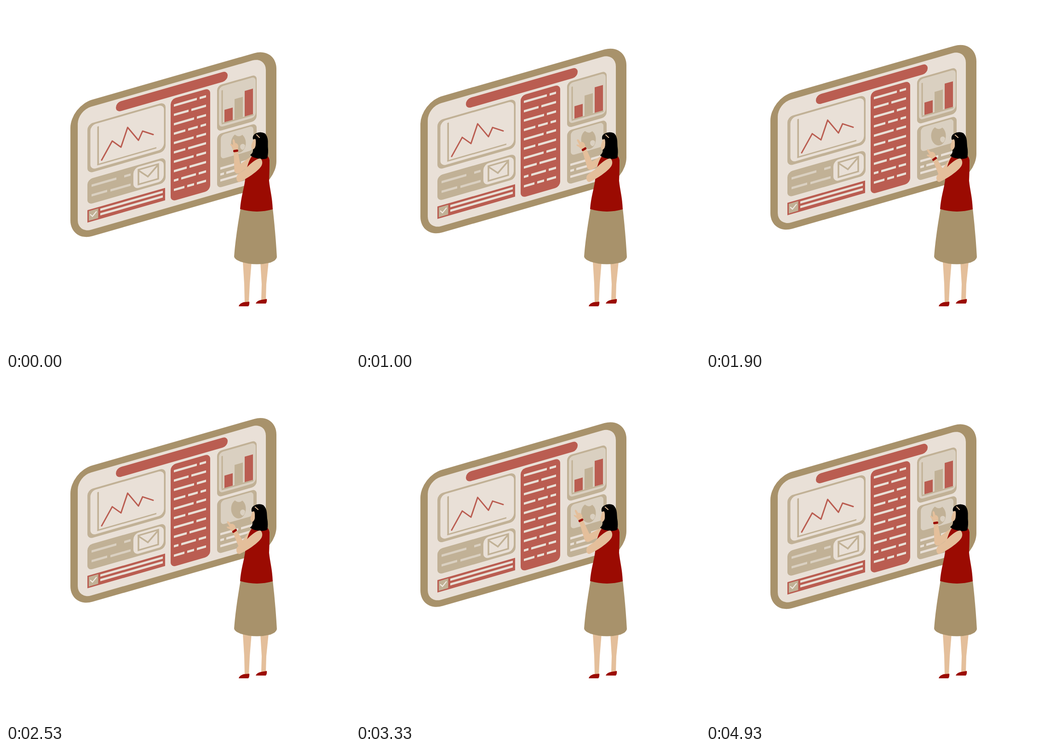
Recreate the animation shown at these times as an HTML page. Size 748 by 748 pixels, loop 5.01 s.

```html
<!DOCTYPE html>
<html lang="en">
<head>
<meta charset="utf-8">
<title>Dashboard</title>
<style>
  html, body { margin: 0; width: 100%; height: 100%; overflow: hidden; background: #fff; }
  svg { display: block; width: 100vw; height: 100vh; }
  .frame { fill: #a8926b; }
  .paper { fill: #e9e0d7; }
  .red { fill: #ba5d51; }
  .taupe { fill: #c1b196; }
  .pale { fill: #dad0c1; }
  .skin { fill: #e4bf9b; }
  .top { fill: #9b0b02; }
  .line { fill: none; stroke: #c1b196; stroke-width: 3.5; }
</style>
</head>
<body>
<svg viewBox="0 0 748 748">
  <g id="screen">
    <g id="panel" transform="matrix(1 -.287 0 1 0 40.18)"></g>
    <path class="line" d="M288 357.500L308.500 371L331 345"/>
    <path fill="none" stroke="#ba5d51" stroke-width="3" stroke-linecap="round" stroke-linejoin="round"
      d="M208 335L231 293.500L250 307L264.500 264L288 292L297 272L320 279.500"/>
    <path fill="none" stroke="#f3ece4" stroke-width="2.200" d="M183 453L188 457.500L197 446.500"/>
    <ellipse class="taupe" cx="505.500" cy="298" rx="16" ry="21"/>
    <path class="pale" d="M497 279Q506 287 514 280L511 276Q505 275 497 279ZM510 302Q516 297 520 303Q519 312 514 313Q507 309 510 302Z"/>
  </g>

  <g class="skin">
    <path id="upper" fill="none" stroke="#e4bf9b" stroke-width="15" stroke-linecap="round"/>
    <path id="forearm"/>
    <g id="hand">
      <path d="M-4.500 1Q-6 -6 -7 -10Q-11 -15 -9 -17Q-7 -17 -4 -13L-3.500 -24Q-1.500 -28 .500 -24L1.500 -17Q7 -16 7 -9L4.500 1Z"/>
      <rect class="top" x="-5.500" y="-2.500" width="11" height="5" rx="2"/>
    </g>
    <path d="M515 556L518 605L519 646H528L530 605L534 556ZM553 556L556 605L555 640H565L566 605L571 556Z"/>
  </g>
  <path class="top" d="M506 653Q507 647 517 644L529 643Q530 649 527 653ZM543 647Q545 641 555 639L567 637Q568 643 565 647Z"/>
  <path class="frame" d="M510 440C505 470 499 505 496 545Q497 551 510 556Q542 566 575 558Q588 553 589 546C587 510 584 475 580 440Z"/>
  <path class="top" d="M535 326C526 338 521 360 520 378C517 400 511 415 509 441.500Q545 452 580 442C579 415 574 400 572 380C573 360 573 345 573 335Q571 324 560 321Z"/>
  <g id="head">
    <path class="skin" d="M539 288L534 301Q532 308 536 312L540 318H550V288Z"/>
    <path d="M537 290Q535 281 543 277Q553 272 563 277Q569 283 569.500 294V306Q571 320 568 331Q559 335 545 331Q535 329 531 324Q538 319 537 312Q543 309 543 300Q544 292 542 289Z"/>
    <path d="M545 280L551 286" stroke="#e4bf9b" stroke-width="2" stroke-linecap="round"/>
  </g>
  <path class="skin" d="M549 332C540 335 529 345 519 356C509 363 501 366 501 374C501 381 506 385 511 381C523 376 545 361 553 351C559 344 558 336 554 332Q552 331 549 332Z"/>
</svg>
<script>
const el = id => document.getElementById(id);
const NS = 'http://www.w3.org/2000/svg';

// Rounded box from left/top to right/bottom on the slanted panel.
function box(cls, left, top, right, bottom, r = 0) {
  const node = document.createElementNS(NS, 'rect');
  const attrs = { class: cls, x: left, y: top, width: right - left, height: bottom - top, rx: r };
  for (const name in attrs) node.setAttribute(name, attrs[name]);
  el('panel').append(node);
}
const dash = (y, left, right, cls = 'paper') => box(cls, left, y - 2.5, right, y + 2.5);

box('frame', 140, 217.3, 588, 514, 48);
box('paper', 156, 232, 565, 499.5, 29);
box('red', 239, 238.5, 482, 260, 10.7);

// Line chart
box('taupe', 177, 268, 347, 375, 12);
box('paper', 183.5, 272, 343.5, 369, 12);
box('taupe', 198.5, 279, 202, 363);
box('taupe', 198.5, 360.5, 327, 363.5);

// Mail
box('taupe', 177, 388, 347, 443, 11);
box('paper', 277, 392, 343, 438, 12);
box('line', 288, 398.5, 331, 430.5);
dash(404, 186, 240, 'pale'); dash(404, 257, 271, 'pale');
dash(425, 186, 220, 'pale'); dash(426, 227, 271, 'pale');

// Checklist
box('red', 177, 454.5, 346, 481.5);
box('taupe', 180, 457.5, 200.5, 478.5);
dash(461.7, 205, 341); dash(471.7, 205, 341);

// Text column: each row is broken at the given places
box('red', 358, 265.5, 444, 488, 11);
[[418], [400], [412], [393, 420], [411], [393], [411], [396], [378, 416], [391, 412]].forEach((gaps, i) => {
  let left = 365;
  for (const gap of [...gaps, 438]) {
    dash(281 + i * 20.4, left, gap - 3);
    left = gap + 3;
  }
});

// Bar chart
box('taupe', 459, 265, 545, 365, 10);
box('pale', 463, 269, 543, 357, 9);
box('taupe', 468.5, 278, 471.5, 349);
[[475, 322, 'red'], [497, 305, 'taupe'], [519, 293.5, 'red']].forEach(([x, y, cls]) => box(cls, x, y, x + 18, 349));
box('taupe', 469, 349, 538, 352);

// Globe card
box('taupe', 459, 371, 545, 488, 10);
box('pale', 467, 374.5, 538, 427, 8);
dash(447, 466, 505); dash(447, 511, 536);
dash(460, 466, 474); dash(460, 479, 536);
dash(473, 466, 536);

// time, elbow x, y, wrist x, y, hand angle, head angle
const keys = [
  [0, 504, 357, 499.5, 315, -8, 0],
  [600, 504, 324, 494.5, 283, -24, 0],
  [1330, 514, 367, 497, 332.5, -34, -4],
  [2530, 514, 367, 497, 332.5, -34, -4],
  [3330, 504, 349, 489, 309.5, -25, -4],
  [4130, 496, 338, 491, 299, -10, 0],
  [4600, 504, 357, 499.5, 315, -8, 0],
  [5010, 504, 357, 499.5, 315, -8, 0]
];

function slope(i, k) {
  if (!keys[i - 1] || !keys[i + 1]) return 0;
  const rate = j => (keys[j + 1][k] - keys[j][k]) / (keys[j + 1][0] - keys[j][0]);
  const a = rate(i - 1), b = rate(i);
  return a * b <= 0 ? 0 : 2 * a * b / (a + b);
}

function pose(t) {
  const i = keys.findIndex(key => key[0] > t) - 1;
  const a = keys[i], b = keys[i + 1], span = b[0] - a[0], u = (t - a[0]) / span;
  const ease = u * u * (3 - 2 * u);
  return a.slice(1).map((v, n) => v + (b[n + 1] - v) * ease
    + span * u * (1 - u) * ((1 - u) * slope(i, n + 1) - u * slope(i + 1, n + 1)));
}

function draw(now) {
  const t = now % 5010;
  const lift = t < 4040 ? 8 * (1 - Math.cos(2 * Math.PI * t / 4040)) : 0;
  el('screen').setAttribute('transform', `translate(0 ${-lift})`);

  const [ex, ey, wx, wy, hand, head] = pose(t);
  const len = Math.hypot(wx - ex, wy - ey), nx = (ey - wy) / len, ny = (wx - ex) / len;
  const at = (x, y, r) => `${x + nx * r} ${y + ny * r}`;
  el('upper').setAttribute('d', `M540 331L${ex} ${ey}`);
  el('forearm').setAttribute('d',
    `M${at(ex, ey, 7.5)}L${at(wx, wy, 4.5)}L${at(wx, wy, -4.5)}L${at(ex, ey, -7.5)}Z`);
  el('hand').setAttribute('transform', `translate(${wx} ${wy}) rotate(${hand})`);
  el('head').setAttribute('transform', `rotate(${head} 550 328)`);
  requestAnimationFrame(draw);
}
requestAnimationFrame(draw);
</script>
</body>
</html>
```
